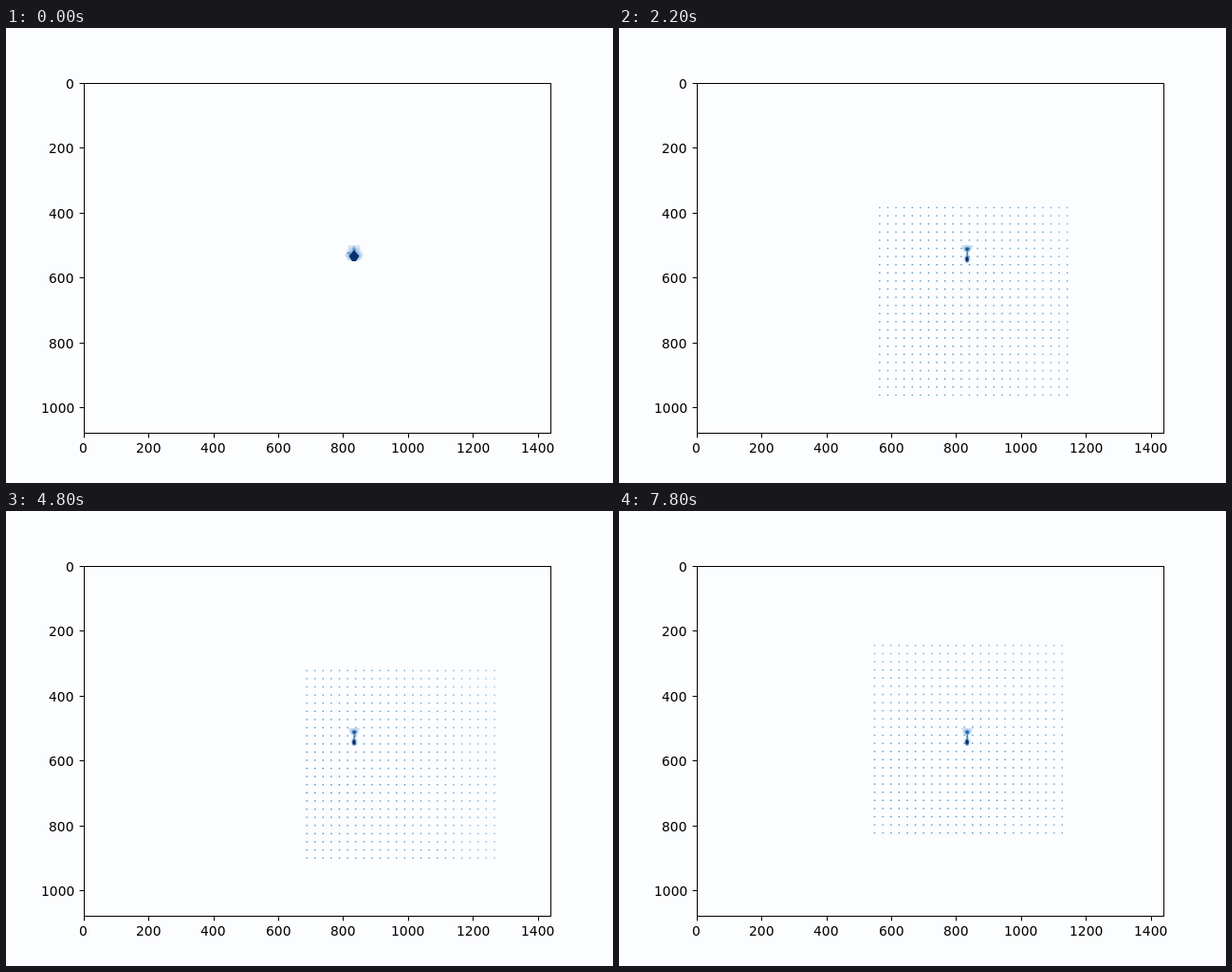
An HTML page with a canvas that plays this animation: 640x480 px, repeating every 8000 ms.

```html
<!DOCTYPE html>
<html lang="en">
<head>
<meta charset="utf-8">
<title>Moving spot grid</title>
<style>
html, body { margin: 0; width: 100%; height: 100%; overflow: hidden; background: #fcfdff; }
canvas { display: block; }
</style>
</head>
<body>
<canvas id="stage" width="640" height="480"></canvas>
<script>
const c = document.getElementById('stage').getContext('2d');
const STEP = 200, STEPS = 40, SIDE = 10;
const LEFT = 269.55, TOP = 141.9, TRAVEL = 47.6, PITCH = 8.6, DOTS = 24;

function line(x1, y1, x2, y2) {
  c.beginPath();
  c.moveTo(x1, y1);
  c.lineTo(x2, y2);
  c.stroke();
}

// Labels start on whole pixels; align is the share of the width left of x.
function label(text, x, baseline, align) {
  c.fillText(text, Math.round(x - c.measureText(text).width * align), baseline);
}

function drawAxes() {
  c.strokeStyle = c.fillStyle = '#000';
  c.lineWidth = 1;
  c.strokeRect(82.5, 58.5, 492, 369);
  c.font = '13.89px "DejaVu Sans", sans-serif';
  const scale = 369.6 / 1080;
  for (let v = 0; v <= 1400; v += 200) {
    const x = 81.6 + scale * (v + 0.5), px = Math.round(x - 0.1) + 0.5;
    line(px, 428, px, 432.4);
    label(v, x, 448, 0.5);
  }
  for (let v = 0; v <= 1000; v += 200) {
    const y = Math.round(57.6 + scale * (v + 0.5));
    line(77.6, y + 0.5, 82, y + 0.5);
    label(v, 71.87, y + 6, 1);
  }
}

// Each side of the square path takes ten steps, pausing once at the corner.
function gridOrigin(step) {
  const side = Math.floor(step / SIDE);
  const p = (step % SIDE) / (SIDE - 1);
  const [u, v] = [[0, p], [p, 1], [1, 1 - p], [1 - p, 0]][side];
  return [LEFT + u * TRAVEL, TOP + v * TRAVEL];
}

function drawGrid(step) {
  const [x0, y0] = gridOrigin(step);
  c.fillStyle = '#2c80bd';
  for (let row = 0; row < DOTS; row++) {
    for (let col = 0; col < DOTS; col++) {
      const x = x0 + col * PITCH, y = y0 + row * PITCH;
      c.globalAlpha = 0.9 * Math.exp(-((x - 345) ** 2 + (y - 290) ** 2) / 75000);
      c.fillRect(x - 0.7, y - 0.7, 1.4, 1.4);
    }
  }
  c.globalAlpha = 1;
}

function glow(x, y, rx, ry, rgb, alpha, core = 0.2) {
  c.save();
  c.translate(x, y);
  c.scale(rx, ry);
  const g = c.createRadialGradient(0, 0, 0, 0, 0, 1);
  g.addColorStop(0, `rgba(${rgb},${alpha})`);
  g.addColorStop(core, `rgba(${rgb},${alpha})`);
  g.addColorStop(1, `rgba(${rgb},0)`);
  c.fillStyle = g;
  c.fillRect(-1, -1, 2, 2);
  c.restore();
}

function polygon(color, ...pts) {
  c.fillStyle = color;
  c.beginPath();
  for (const [x, y] of pts) c.lineTo(x, y);
  c.fill();
}

function drawStar() {
  polygon('rgba(150,185,220,.3)', [360, 229], [374, 229], [372, 236], [377, 240],
    [372, 245], [361, 245], [357, 239], [362, 236]);
  glow(367, 239, 10, 9, '70,145,205', 0.65);
  glow(361.5, 237.5, 3, 2, '40,115,185', 0.6);
  glow(367, 235, 2.5, 6, '30,105,175', 0.7);
  polygon('#08306b', [367, 234.5], [372.5, 240.5], [369, 246], [365, 246], [361.5, 240.5]);
}

function drawCore(step) {
  const flicker = 0.06 * Math.sin(step * 2.4);
  polygon('rgba(130,175,215,.32)', [360.5, 229], [374, 229], [369, 236], [365, 236]);
  glow(367, 233, 6, 4.5, '90,160,215', 0.5 + flicker);
  glow(367, 243.5, 4.5, 5.5, '90,160,215', 0.55);
  glow(367.2, 233.3, 3, 2.8, '8,75,150', 0.9 + flicker, 0.3);
  glow(367.2, 238, 1.6, 5, '33,113,181', 0.85);
  glow(367, 243.9, 2.7, 4.2, '8,48,107', 1, 0.4);
}

function frame(now) {
  const step = Math.floor(now / STEP) % STEPS;
  c.fillStyle = '#fcfdff';
  c.fillRect(0, 0, 640, 480);
  if (step < 2) {
    drawStar();
  } else {
    drawGrid(step);
    drawCore(step);
  }
  drawAxes();
  requestAnimationFrame(frame);
}
frame(0);
</script>
</body>
</html>
```
